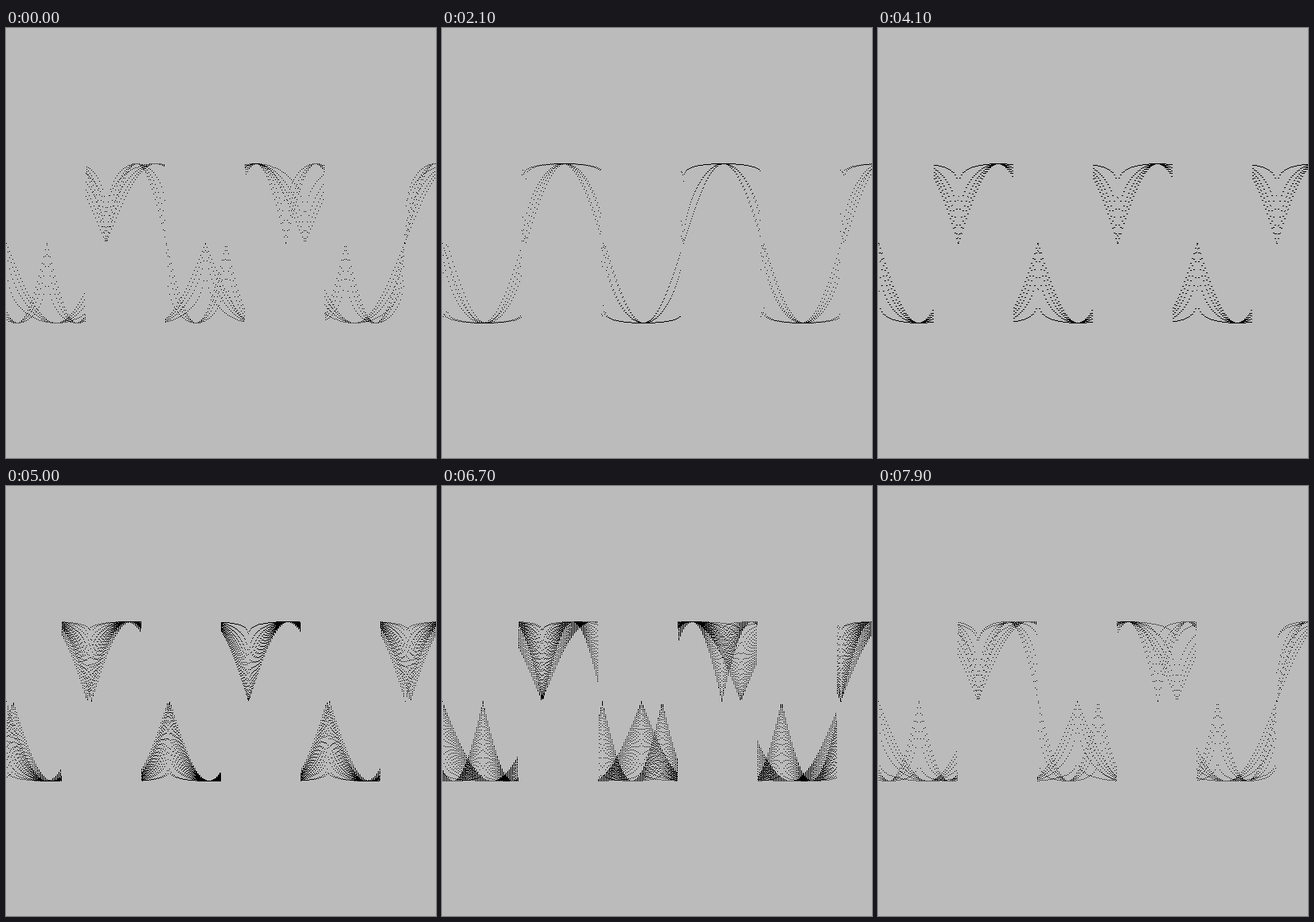
Recreate the animation shown at these times as an HTML page with a canvas. Size 540x540 px, loop 8 s.

```html
<!DOCTYPE html>
<html lang="en">
<head>
<meta charset="utf-8">
<title>Folded waves</title>
<style>
  html, body { margin: 0; width: 100%; height: 100%; overflow: hidden; background: #bbb; }
  canvas { display: block; width: 540px; height: 540px; image-rendering: pixelated; }
</style>
</head>
<body>
<canvas id="stage" width="540" height="540"></canvas>
<script>
const SIZE = 540, MID = 270, AMP = 100, LOOP = 8, TICK = 100;
const ctx = document.getElementById('stage').getContext('2d');

// 1 at both ends of the loop, 0 between the two moments
const dip = (t, down, up, rate) =>
  1 + (Math.tanh(rate * (t - up)) - Math.tanh(rate * (t - down))) / 2;

// One column of dots: the same sine value raised to evenly spaced powers
function column(x, phase, side, gap) {
  const wave = Math.abs(Math.sin(Math.PI * phase));
  for (let p = 1; p > 1e-6; p -= gap) {
    ctx.fillRect(x, Math.round(MID + side * AMP * wave ** p), 1, 1);
  }
}

function draw(t) {
  const spread = 25 * dip(t, 1.58, 5.445, 3.1);
  const edge = 69 + 30 * dip(t, 2.65, 6.48, 4.2);
  const gap = 0.25 + 0.23 * Math.sin(2 * Math.PI * t / LOOP);

  ctx.fillStyle = '#bbb';
  ctx.fillRect(0, 0, SIZE, SIZE);
  ctx.fillStyle = '#000';

  // A wide and a narrow wave share the stage in alternate columns
  for (let x = 0; x < SIZE; x += 2) {
    const side = Math.floor((x - edge) / 100) % 2 ? 1 : -1;
    column(x, x / (100 + spread), side, gap);
    column(x + 1, (x - 500) / (100 - spread), side, gap);
  }
}

let shown = -1;
let start;
function frame(now) {
  start ??= now;
  const tick = Math.floor((now - start) / TICK) % (LOOP * 1000 / TICK);
  if (tick !== shown) draw((shown = tick) * TICK / 1000);
  requestAnimationFrame(frame);
}
draw(0);
requestAnimationFrame(frame);
</script>
</body>
</html>
```
